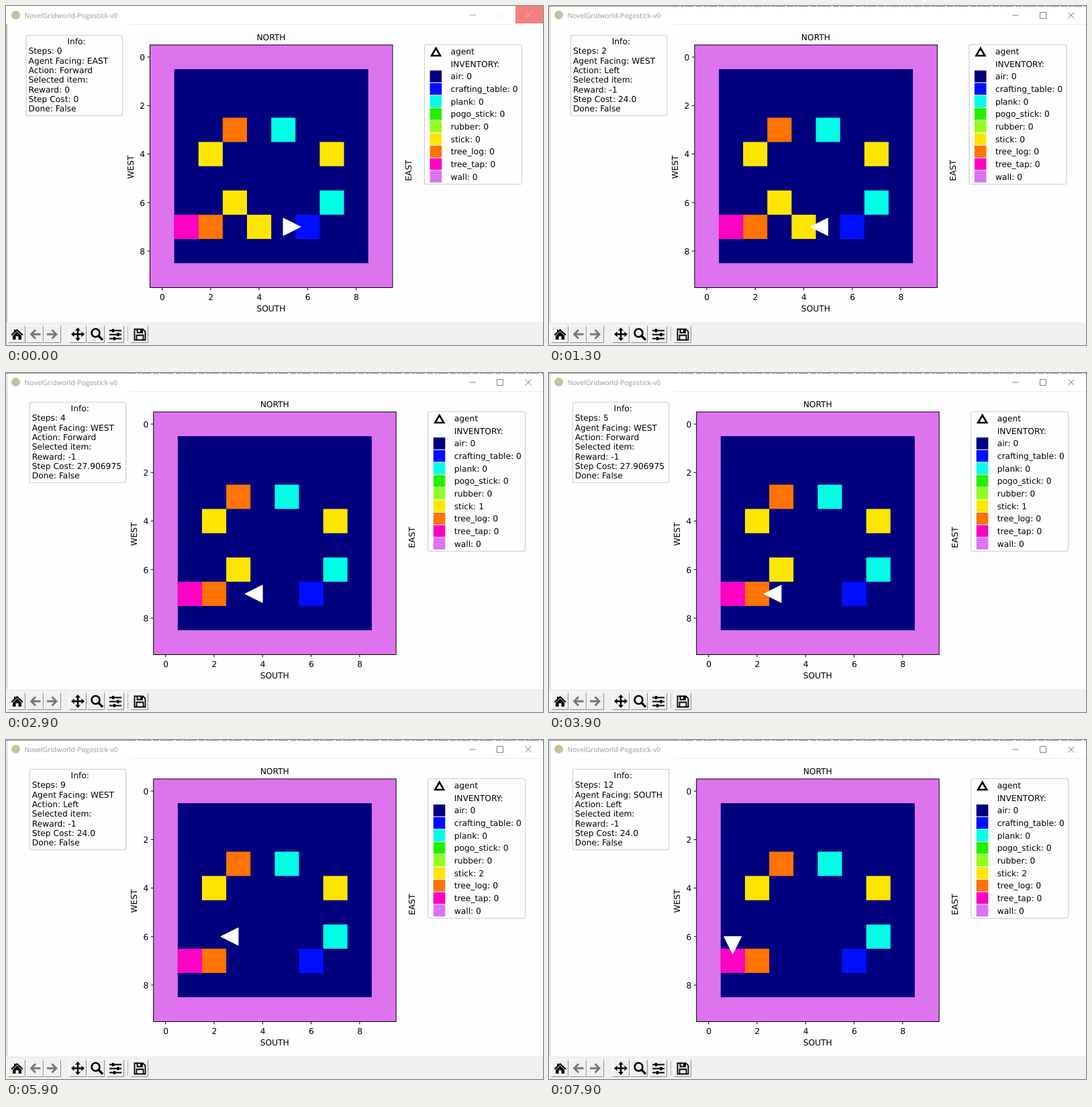
Write an HTML page that moves like this. It is 800x505 px and loops after 8000 ms.

```html
<!DOCTYPE html>
<html lang="en">
<head>
<meta charset="utf-8">
<title>Gridworld</title>
<style>
html, body { margin: 0; width: 100%; height: 100%; overflow: hidden; background: #fff; }
svg { display: block; width: 800px; height: 505px; }
text { font: 12.25px "DejaVu Sans", sans-serif; fill: #000; white-space: pre; text-rendering: geometricPrecision; }
.title { font: 10.3px "Open Sans", "Noto Sans", sans-serif; fill: #979797; }
.mid { text-anchor: middle; }
.end { text-anchor: end; }
.box { fill: #fefdff; stroke: #cfcfd4; stroke-width: 1.2; }
.line { fill: none; stroke: #000; }
</style>
</head>
<body>
<svg viewBox="0 0 800 505">
  <rect width="800" height="505" fill="#fefdff"/>
  <rect width="800" height="27" fill="#fff"/>
  <path d="M186 27.5H800" stroke="#ececec"/>
  <circle cx="14.5" cy="13.5" r="6.5" fill="#cbbf9f"/>
  <text class="title" x="27.5" y="17.5">NovelGridworld-Pogostick-v0</text>

  <g id="idle">
    <rect x="759" width="41" height="26" fill="#f2807f"/>
    <path class="line" d="M691 13.5h9" style="stroke:#aaa"/>
    <path class="line" d="M732.500 9.500h8v8h-8z" style="stroke:#eee"/>
    <path class="line" d="M774 9l9 9m0-9l-9 9" style="stroke:#f7b5b5"/>
    <path class="line" d="M1 27V505" style="stroke:#777"/>
  </g>
  <g id="active">
    <path class="line" d="M0 .5H185" style="stroke:#999"/>
    <path class="line" d="M185 .5H800" style="stroke:#8d8796" stroke-dasharray="9 2 5 1 14 3"/>
    <path class="line" d="M690.500 14h9M731.500 9.500h9v9h-9zM773.500 9.500l9 9m0-9l-9 9" style="stroke:#808080"/>
    <path class="line" d="M1.500 1V471" style="stroke:#c4c4c4"/>
  </g>

  <g id="figure">
    <g id="grid"></g>
    <rect class="line" x="214.500" y="58" width="361.500" height="361.500"/>
    <g id="axes"></g>
    <path id="agent" fill="#fff" stroke="#fff" stroke-linejoin="round" d="M0-13V13L26 0Z"/>
    <rect class="box" x="30" y="43.500" width="143.500" height="120" rx="3"/>
    <text class="mid" x="105" y="57">Info:</text>
    <g id="info"></g>
    <rect class="box" x="623.500" y="57.500" width="145" height="208" rx="3"/>
    <path class="line" d="M640.500 62.800L647 74H634Z" stroke-width="2.600"/>
    <g id="legend"></g>
  </g>

  <rect x="1" y="471" width="799" height="34" fill="#f0f0f0"/>
  <g id="buttons"></g>
  <path class="line" d="M181.500 478v22" style="stroke:#b5b5b5"/>
  <g id="icons">
    <path d="M16.500 481L25.500 489.500L24 491L16.500 484L9 491L7.500 489.500L12 485.200V482h2v1.400ZM10 491.200L16.500 485L23 491.200V497H18.500V492H14.500V497H10Z"/>
    <path id="arrow" fill="#777" d="M43 481.500L45 483.500L41 487.500H51.500V490.500H41L45 494.500L43 496.500L35.500 489Z"/>
    <use href="#arrow" transform="matrix(-1 0 0 1 112.500 0)"/>
    <path d="M107 479l4 4.500h-2.800v4.300h4.300V485l4.500 4l-4.500 4v-2.800h-4.300v4.300H111l-4 4.500l-4-4.500h2.800v-4.300h-4.300V493L97 489l4.500-4v2.800h4.300v-4.300H103Z"/>
    <circle class="line" cx="133.500" cy="487" r="6" stroke-width="2.600"/>
    <path class="line" d="M138 491.500l6 6" stroke-width="3.400"/>
    <path class="line" d="M154 483.500h18M154 489.500h18M154 495.500h18" stroke-width="1.800"/>
    <path class="line" d="M159.500 481v5M167 487v5M161.500 493v5" stroke-width="3.200"/>
    <path class="line" d="M191.500 481.500h12.500l3.500 3.500v12.500h-16zM195.500 482v4.500h7.500V482M194.500 497v-6.500h10v6.500" stroke-width="1.800"/>
    <path d="M200 482h2.500v4H200z"/>
  </g>
</svg>
<script>
const $ = id => document.getElementById(id);
const add = (parent, tag, attrs, text = '') => {
  const el = document.createElementNS('http://www.w3.org/2000/svg', tag);
  for (const key in attrs) el.setAttribute(key, attrs[key]);
  el.textContent = text;
  return parent.appendChild(el);
};

const CELL = 36.13, LEFT = 214.5, TOP = 58, LOOP = 8000;
const colors = {
  air: '#00007f', crafting_table: '#000fff', plank: '#00ffe5', pogo_stick: '#22f000', rubber: '#90ff1e',
  stick: '#ffe600', tree_log: '#ff7300', tree_tap: '#ff00c4', wall: '#de73ee'
};
const cell = (x, y, kind, size = 1) => add($('grid'), 'rect', {
  x: LEFT + x * CELL, y: TOP + y * CELL, width: size * CELL, height: size * CELL, fill: colors[kind]
});

cell(0, 0, 'wall', 10);
cell(1, 1, 'air', 8);
[[3, 3, 'tree_log'], [5, 3, 'plank'], [2, 4, 'stick'], [7, 4, 'stick'], [7, 6, 'plank'],
 [1, 7, 'tree_tap'], [2, 7, 'tree_log'], [6, 7, 'crafting_table']].forEach(c => cell(...c));
// Sticks the agent collects, in order
const collected = [cell(4, 7, 'stick'), cell(3, 6, 'stick')];

const axes = $('axes');
for (let n = 0; n < 10; n += 2) {
  const d = (n + .5) * CELL;
  add(axes, 'path', { class: 'line', d: `M${LEFT + d} 419.5v4M${LEFT} ${TOP + d}h-4` });
  add(axes, 'text', { class: 'mid', x: LEFT + d + .3, y: 437.5 }, n);
  add(axes, 'text', { class: 'end', x: 207, y: TOP + d + 4.7 }, n);
}
add(axes, 'text', { class: 'mid', x: 395, y: 50.5 }, 'NORTH');
add(axes, 'text', { class: 'mid', x: 395, y: 455 }, 'SOUTH');
add(axes, 'text', { class: 'mid', transform: 'translate(189.5 240) rotate(-90)' }, 'WEST');
add(axes, 'text', { class: 'mid', transform: 'translate(604 245) rotate(-90)' }, 'EAST');

const legend = $('legend'), pitch = 18.65;
add(legend, 'text', { x: 662.5, y: 72 }, 'agent');
add(legend, 'text', { x: 662.5, y: 90.7 }, 'INVENTORY:');
const counts = {};
Object.keys(colors).forEach((kind, i) => {
  const y = 109.3 + i * pitch;
  add(legend, 'rect', { x: 631.5, y: y - 13.2, width: 17.6, height: 17.6, fill: colors[kind] });
  counts[kind] = add(legend, 'text', { x: 662.5, y }, kind + ': 0');
});

const info = [...Array(7).keys()].map(i => add($('info'), 'text', { x: 33.5, y: 71.3 + i * 14.33 }));

[3.5, 30.5, 56.5, 94.5, 121.5, 150.5, 186.5].forEach(x => {
  add($('buttons'), 'path', { d: `M${x} 502V476.5h25`, fill: 'none', stroke: '#fff' });
  add($('buttons'), 'path', { d: `M${x} 501.5h25V476.5`, fill: 'none', stroke: '#8c8c8c' });
});

// Each step: start time, action
const plan = [[0, ''], [600, 'Left'], [1200, 'Left'], [1900, 'Break'], [2800, 'Forward'], [3500, 'Forward'],
  [4200, 'Right'], [4800, 'Break'], [5300, 'Forward'], [5800, 'Left'], [6500, 'Forward'], [7100, 'Forward'], [7600, 'Left']];
const costs = { Left: '24.0', Right: '24.0', Forward: '27.906975', Break: '3600.0' };
const facings = ['EAST', 'SOUTH', 'WEST', 'NORTH'];

let x = 5, y = 7, dir = 0, sticks = 0;
const states = plan.map(([start, action], step) => {
  if (action === 'Left') dir = (dir + 3) % 4;
  if (action === 'Right') dir = (dir + 1) % 4;
  if (action === 'Break') sticks++;
  if (action === 'Forward') {
    x += [1, 0, -1, 0][dir];
    y += [0, 1, 0, -1][dir];
  }
  return {
    start, x, y, dir, sticks,
    shift: step < 2 ? 0 : step < 3 ? 2.4 : 5.2,
    lines: [
      'Steps: ' + step, 'Agent Facing: ' + facings[dir], 'Action: ' + (action || 'Forward'), 'Selected item:',
      'Reward: ' + (!step ? 0 : action === 'Break' ? 10 : -1), 'Step Cost: ' + (costs[action] || 0), 'Done: False'
    ]
  };
});

let shown;
function show(s) {
  $('figure').setAttribute('transform', `translate(${s.shift})`);
  $('agent').setAttribute('transform',
    `translate(${LEFT + (s.x + .5) * CELL - .2} ${TOP + (s.y + .5) * CELL}) rotate(${s.dir * 90})`);
  s.lines.forEach((line, i) => info[i].textContent = line);
  counts.stick.textContent = 'stick: ' + s.sticks;
  collected.forEach((el, i) => el.style.display = i < s.sticks ? 'none' : '');
}

function tick() {
  const t = performance.now() % LOOP;
  const state = states.filter(s => s.start <= t).pop();
  if (state !== shown) show(shown = state);
  $('idle').style.display = t < 100 ? '' : 'none';
  $('active').style.display = t < 100 ? 'none' : '';
  requestAnimationFrame(tick);
}
tick();
</script>
</body>
</html>
```
